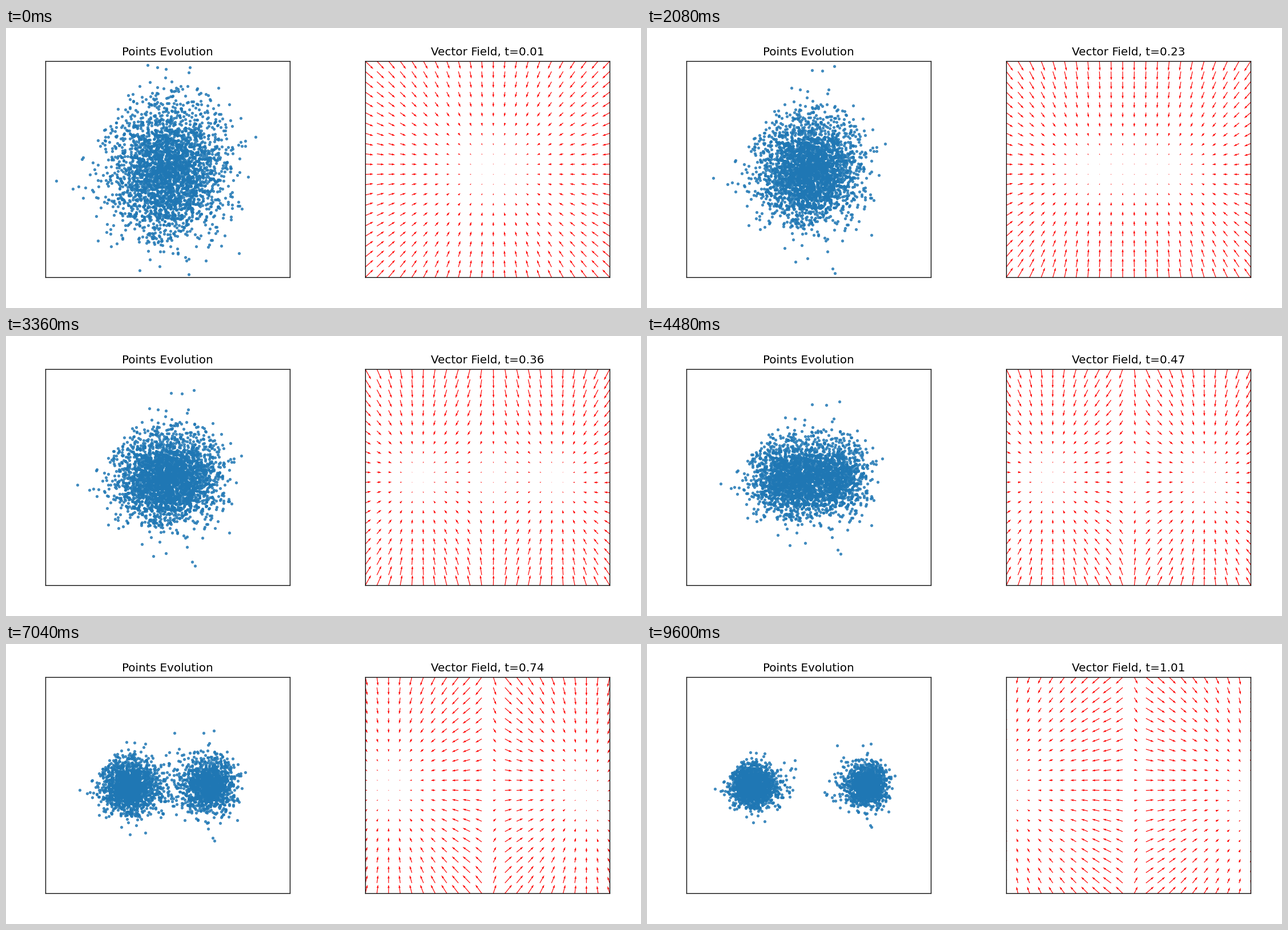
Animation of 1112 by 491 pixels, one loop 9.76 s. Source, as a matplotlib script:

```python
import numpy as np
import matplotlib.pyplot as plt
from matplotlib.animation import FuncAnimation

W, H, DPI = 1112, 491, 128
PANEL_W, PANEL_H = 428, 379
TOP = 58.2
STEPS, INTERVAL = 60, 160
COUNT = 3000
GRID = 22
XMAX, YMAX = 4, 3
PX = 72 / DPI  # one pixel in points

# A few stray points far from the cloud, as (x, y).
STRAYS = [(-3.65, -.32), (.88, -3.53), (.97, -3.7), (.12, 3.52), (.5, 3.5)]


def contraction(t):
    return 1.05 + .97 * t - 1.14 * t**2


def split_gain(t):
    return .12 + 3.6 / (1 + np.exp(-10 * (t - .47)))


def velocity(x, y, t):
    """Flow from one broad Gaussian to two narrow ones at x = -2 and x = 2."""
    rate = contraction(t)
    side = np.tanh(split_gain(t) * (x - .08))
    drift = .15 * max(0, 1 - 3 * t)
    u = 2 * side - rate * (x - 2 * t * side) + drift
    v = -rate * (y + .4 * t * np.maximum(0, x - 2.4))
    return u, v


def mid_time(k):
    return (k + .5) / STEPS


def evolve():
    rng = np.random.default_rng(7)
    cloud = rng.normal(0, .9, (COUNT - len(STRAYS), 2))
    x, y = np.vstack([cloud, STRAYS]).T
    dt = 1 / STEPS
    states = [(x, y)]
    for k in range(STEPS):
        u, v = velocity(x, y, k * dt)
        u, v = velocity(x + u * dt / 2, y + v * dt / 2, mid_time(k))
        x, y = x + u * dt, y + v * dt
        states.append((x, y))
    return states


def panel(left):
    ax = fig.add_axes([left / W, 1 - (TOP + PANEL_H) / H,
                       PANEL_W / W, PANEL_H / H])
    ax.set(xlim=(-XMAX, XMAX), ylim=(-YMAX, YMAX), xticks=[], yticks=[])
    for spine in ax.spines.values():
        spine.set_linewidth(1.33 * PX)
    return ax


def add_title(ax, text):
    return ax.set_title(text, fontsize=20 * PX, pad=10 * PX)


plt.rcParams["font.family"] = "DejaVu Sans"
fig = plt.figure(figsize=(W / DPI, H / DPI), dpi=DPI, facecolor="white")
states = evolve()

points_ax = panel(69.2)
add_title(points_ax, "Points Evolution")
dots, = points_ax.plot([], [], "o", color="#1f77b4", alpha=.85,
                       markersize=5.2 * PX, markeredgewidth=0)

field_ax = panel(629.2)
title = add_title(field_ax, "")
gx, gy = np.meshgrid(np.linspace(-XMAX, XMAX, GRID),
                     np.linspace(-YMAX, YMAX, GRID))
arrows = field_ax.quiver(gx, gy, *velocity(gx, gy, 0), color="red", scale=90)


def update(k):
    t = mid_time(k)
    u, v = velocity(gx, gy, t)
    dots.set_data(*states[k])
    # Keep the mean arrow length constant.
    arrows.scale = 1.8 * GRID * np.hypot(u, v).mean()
    arrows.set_UVC(u, v)
    title.set_text(f"Vector Field, t={t:.2f}")
    return dots, arrows, title


anim = FuncAnimation(fig, update, frames=STEPS + 1, interval=INTERVAL,
                     repeat=True, repeat_delay=0, blit=False)
plt.show()
```
